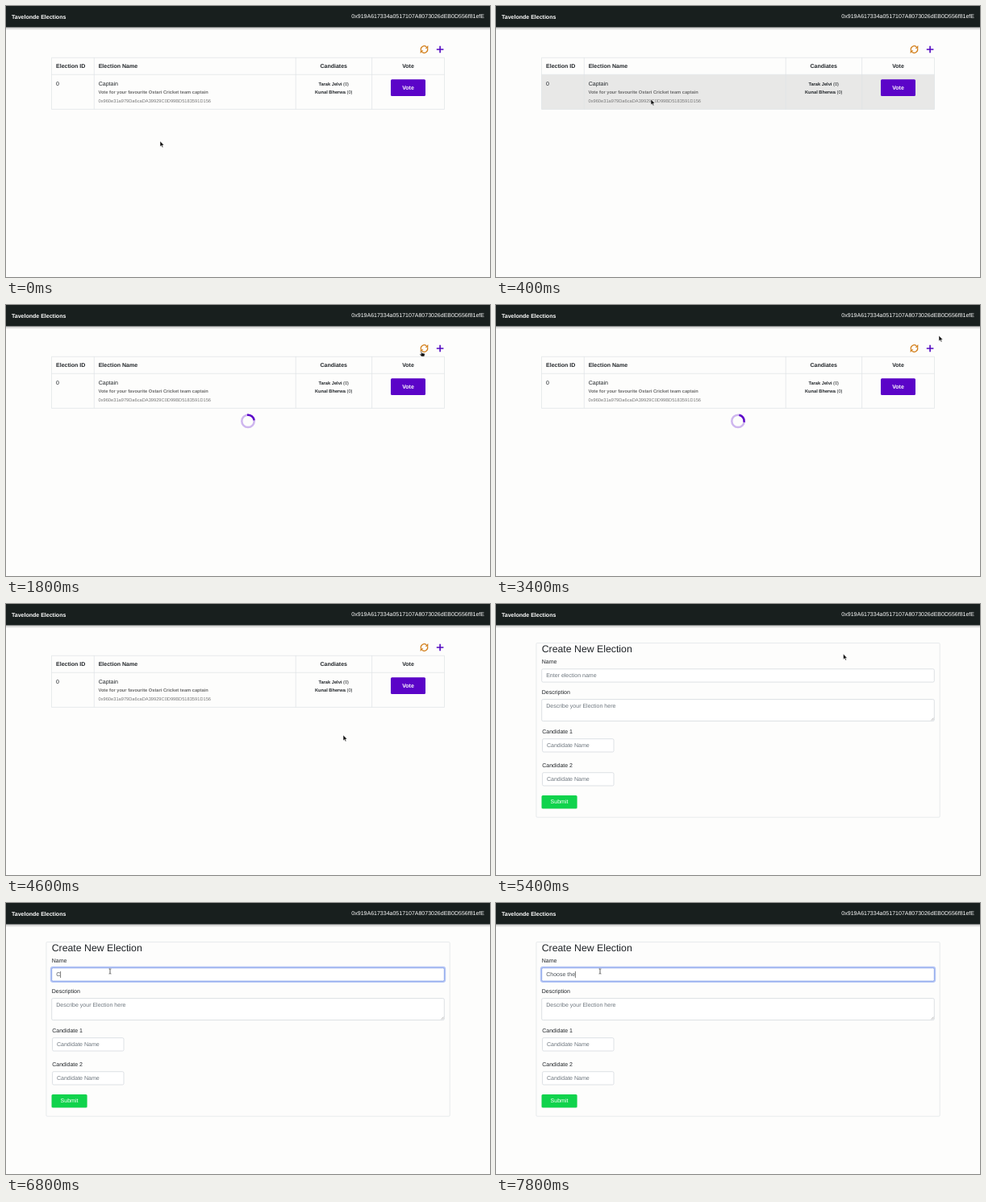
An HTML page for the animation above (8000 ms loop, 600 by 337 pixels).

```html
<!DOCTYPE html>
<html lang="en">
<head>
<meta charset="utf-8">
<title>Elections</title>
<style>
  html, body { margin: 0; width: 100%; height: 100%; overflow: hidden; background: #fdfdfc; }
  svg { display: block; width: 100%; height: 100%; }
  text { font: 7.03px "Liberation Sans", Arial, sans-serif; fill: #212529; text-rendering: geometricPrecision; white-space: pre; }
  .b, .b text { font-weight: bold; }
  .small, .small text { font-size: 5.71px; }
  .mid, .mid text { text-anchor: middle; }
  .white { fill: #fff; }
  .muted { fill: #6c757d; }
  .grid { fill: none; stroke: #dee2e6; stroke-width: .7; }
  .field { fill: #fff; stroke: #ced4da; stroke-width: .7; }
  .cursor { stroke: #fff; stroke-width: .5; fill: #111; }
</style>
</head>
<body>
<svg viewBox="0 0 600 337" preserveAspectRatio="none">
  <defs>
    <linearGradient id="shade" x2="0" y2="1">
      <stop stop-color="#000" stop-opacity=".28"/>
      <stop offset="1" stop-color="#000" stop-opacity="0"/>
    </linearGradient>
  </defs>
  <rect width="600" height="337" fill="#fdfdfc"/>

  <g id="list">
    <rect id="row" x="56.5" y="85.5" width="487" height="43" fill="#e8e8e7"/>
    <path class="grid" d="M56.5 64.3H543.5V128.4H56.5ZM109.3 64V128.4M359.2 64V128.4M453.6 64V128.4"/>
    <path class="grid" stroke-width="1" d="M56.5 85.3H543.5"/>
    <g class="b">
      <text x="62" y="76.8">Election ID</text>
      <text x="114.7" y="76.8">Election Name</text>
      <g class="mid">
        <text x="406.2" y="76.8">Candiates</text>
        <text x="498.5" y="76.8">Vote</text>
      </g>
    </g>
    <text x="62" y="98.8">0</text>
    <text x="114.7" y="98.8">Captain</text>
    <g class="small">
      <text class="b" x="114.5" y="109.3" style="fill:#6b6b6b">Vote for your favourite Ostari Cricket team captain</text>
      <text x="114.5" y="119.8" style="fill:#777">0x960e31a979Da6caDA39929C0D99BD5183591D156</text>
      <g class="mid">
        <text x="406.2" y="98.9"><tspan class="b">Tarak Jelvi</tspan> (0)</text>
        <text x="406.2" y="109.3"><tspan class="b">Kunal Bherwa</tspan> (0)</text>
      </g>
    </g>
    <rect x="477" y="91.3" width="43" height="20.7" rx="1.5" fill="#5b04c8"/>
    <text class="b mid white" x="498.5" y="104.2">Vote</text>
    <g transform="translate(518.5 54)" fill="none" stroke="#d27d17" stroke-width="1.15">
      <path d="M-4.1 1.1A4.2 4.2 0 0 1 2.7 -3.2M4.1 -1.1A4.2 4.2 0 0 1 -2.7 3.2"/>
      <path fill="#d27d17" stroke="none" d="M4.8 -4.9V-1.2H1.1ZM-4.8 4.9V1.2H-1.1Z"/>
    </g>
    <path d="M533.8 54H542.4M538.1 49.7V58.3" stroke="#5208c0" stroke-width="1.6"/>
    <g id="spinner" fill="none" stroke-width="2.5">
      <circle cx="300" cy="144.4" r="7.7" stroke="#ceb6ee"/>
      <path id="arc" d="M300 136.7A7.7 7.7 0 0 1 307.7 144.4" stroke="#5b04c8"/>
    </g>
  </g>

  <g id="form">
    <rect class="grid" x="49.9" y="48.6" width="500.3" height="216.6" rx="1.2"/>
    <text x="56.7" y="60.2" style="font-size:12.3px">Create New Election</text>
    <text x="56.7" y="74.2">Name</text>
    <text x="56.7" y="111.9">Description</text>
    <text x="57.2" y="160.6">Candidate 1</text>
    <text x="57.2" y="202.7">Candidate 2</text>
    <rect id="ring" x="56" y="80" width="488" height="17.8" rx="2.2" fill="none" stroke="#b7c7f5" stroke-width="2.4"/>
    <rect id="nameField" class="field" x="56.7" y="80.8" width="486.6" height="16.3" rx="1.6"/>
    <text id="name" x="62.2" y="91.4"></text>
    <path id="caret" stroke="#222" stroke-width=".6"/>
    <rect class="field" x="56.7" y="118.6" width="486.6" height="27" rx="1.6"/>
    <path d="M539.6 144.6L542.5 141.7M541.3 144.6L542.5 143.4" stroke="#777" stroke-width=".5"/>
    <text class="muted" x="62.2" y="129.2">Describe your Election here</text>
    <rect class="field" x="57.5" y="167.7" width="88.5" height="16.3" rx="1.6"/>
    <text class="muted" x="63" y="178.3">Candidate Name</text>
    <rect class="field" x="57.5" y="209.7" width="88.5" height="16.3" rx="1.6"/>
    <text class="muted" x="63" y="220.3">Candidate Name</text>
    <rect x="56.2" y="238" width="44.8" height="17" rx="1.8" fill="#0b3" opacity=".3"/>
    <rect x="56.7" y="238" width="43.7" height="16.2" rx="1.5" fill="#10d34c"/>
    <text class="mid white" x="78.5" y="248.4">Submit</text>
    <g id="tip">
      <rect x="134" y="91.8" width="69.8" height="11.4" fill="#050505"/>
      <text class="white" x="137" y="99.8" style="font:6.3px 'Noto Sans',sans-serif">Please fill in this field.</text>
    </g>
  </g>

  <rect y="26" width="600" height="4" fill="url(#shade)"/>
  <rect width="600" height="26.4" fill="#181f1e"/>
  <text class="b white" x="7" y="15.6">Tavelonde Elections</text>
  <text class="white" x="593" y="15.4" text-anchor="end">0x919A617334a0517107A8073026dEB0D556f81efE</text>

  <g id="pointer">
    <path id="arrow" class="cursor" d="M0 0V6.9L1.6 5.5L2.7 8L3.9 7.5L2.8 5.1H4.9Z"/>
    <path id="hand" class="cursor" d="M1.4 .6Q2 -.2 2.6 .6V2.7L5.6 3.2Q6.4 3.5 6.2 4.5L5.6 7H2L0 4.5Q-.2 3.6 .7 3.8L1.4 4.4Z"/>
    <path id="beam" d="M-1.4 -3H-.4L0 -2.6L.4 -3H1.4M0 -2.6V2.6M-1.4 3H-.4L0 2.6L.4 3H1.4" fill="none" stroke="#222" stroke-width=".7"/>
  </g>
</svg>
<script>
const LOOP = 8000, STEP = 200;
const PAGE_CHANGE = 5200, TIP_SHOWN = 6200, FOCUS = 6400, TYPING = 6800;
const TYPED = "Choose the";
const $ = id => document.getElementById(id);
const show = (id, on) => { $(id).style.display = on ? "" : "none"; };

// Pointer waypoints: time, x, y
const route = [
  [0, 191, 168], [400, 192, 116], [600, 196, 113], [1200, 513, 57], [2600, 513, 57],
  [3000, 553, 42], [3400, 549, 38], [3600, 549, 38], [4600, 418, 163],
  [5000, 536, 54], [5200, 536, 54], [5800, 129, 85], [LOOP, 129, 85]
];

function pointerAt(t) {
  const i = route.findIndex(point => point[0] > t);
  const [t0, x0, y0] = route[i - 1], [t1, x1, y1] = route[i];
  const p = (t - t0) / (t1 - t0), e = p * p * (3 - 2 * p);
  return [x0 + (x1 - x0) * e, y0 + (y1 - y0) * e];
}

function inside(x, y, left, top, right, bottom) {
  return x >= left && x <= right && y >= top && y <= bottom;
}

function drawList(t, x, y) {
  show("row", inside(x, y, 56, 86, 544, 128));
  show("spinner", t >= 1600 && t < 3800);
  const angle = (t - 1800) / 780 * 360 - 8;
  $("arc").setAttribute("transform", `rotate(${angle} 300 144.4)`);
}

function drawForm(t) {
  const focused = t >= FOCUS;
  const count = t < TYPING ? 0 : Math.floor((t - TYPING) / 110) + 1;
  const name = $("name");
  name.textContent = count ? TYPED.slice(0, count) : "Enter election name";
  name.style.fill = count ? "#495057" : "#6c757d";
  $("nameField").style.stroke = focused ? "#6d8fe2" : "";
  show("ring", focused);
  show("tip", t >= TIP_SHOWN && !focused);
  show("caret", focused);
  const end = 62.5 + (count ? name.getComputedTextLength() : 0);
  $("caret").setAttribute("d", `M${end} 85V93`);
}

function draw(now) {
  const t = Math.floor(now % LOOP / STEP) * STEP;
  const [x, y] = pointerAt(t);
  const onForm = t >= PAGE_CHANGE;
  show("list", !onForm);
  show("form", onForm);
  if (onForm) drawForm(t); else drawList(t, x, y);

  const beam = onForm && inside(x, y, 56, 80, 544, 98);
  const hand = !onForm && (inside(x, y, 512, 48, 544, 60) || inside(x, y, 477, 91, 520, 112));
  show("beam", beam);
  show("hand", hand);
  show("arrow", !beam && !hand);
  $("pointer").setAttribute("transform", `translate(${x} ${y})`);
}

const start = performance.now();
function tick() {
  draw(performance.now() - start);
  requestAnimationFrame(tick);
}
tick();
</script>
</body>
</html>
```
